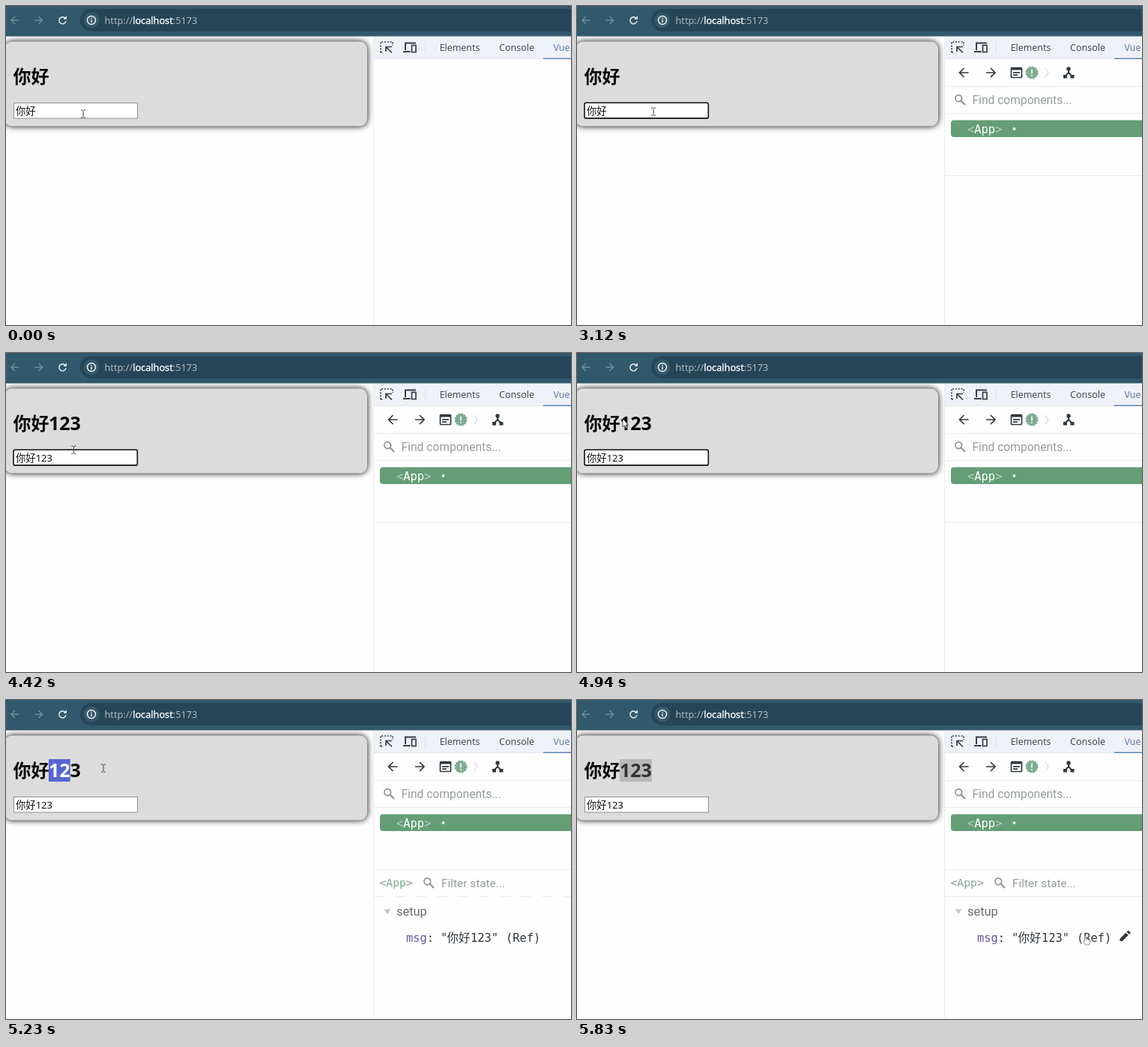
These frames come from a looping animation (754 px wide and 426 px high, 5930 ms). An HTML page:

```html
<!DOCTYPE html>
<html lang="zh-CN">
<head>
<meta charset="utf-8">
<title>Lazy model binding</title>
<style>
  html, body { margin: 0; width: 100%; height: 100%; overflow: hidden; background: #fefefe; }
  svg { display: block; width: 100vw; height: 100vh; }
  .ui { font-family: "Noto Sans", "Noto Sans CJK SC", "Noto Sans CJK JP", sans-serif; }
  .cjk { font-family: "Noto Sans CJK SC", "Noto Sans CJK JP", "Noto Sans CJK", sans-serif; }
  .rob { font-family: Roboto, sans-serif; font-size: 15.6px; fill: #969c9c; }
  .mono { font-family: "DejaVu Sans Mono", "Noto Sans CJK SC", monospace; font-size: 15.4px; fill: #2f363c; }
  .line { stroke: #ececee; stroke-width: 1; }
  .icon { fill: none; stroke-width: 1.7; }
</style>
</head>
<body>
<svg viewBox="0 0 754 426">
  <defs>
    <filter id="blur" x="-10%" y="-30%" width="120%" height="160%"><feGaussianBlur stdDeviation="4.2"/></filter>
    <g id="lens" class="icon" stroke="#8d9494"><circle cx="-1.7" cy="-1.7" r="4.4"/><path d="M1.6 1.6L7 7" stroke-width="2.1"/></g>
    <path id="arrow" d="M6 0H-5.5M0-6L-6 0L0 6"/>
  </defs>
  <rect width="754" height="426" fill="#fefefe"/>

  <!-- page card -->
  <rect x="-2" y="47.6" width="484" height="112.8" rx="10" filter="url(#blur)"/>
  <rect x="-2" y="47.6" width="484" height="112.8" rx="10" fill="#dcdcdc"/>
  <rect id="mark" x="57" y="79" height="30"/>
  <g font-size="24" font-weight="700" fill="#080808">
    <text x="9.5" y="103" class="cjk">你好</text>
    <text x="57" y="103" class="ui" font-size="25"><tspan id="picked"></tspan><tspan id="rest"></tspan></text>
  </g>
  <rect id="field" fill="#fff"/>
  <g font-size="13.3" fill="#111">
    <text x="13" y="144.5" class="cjk">你好</text>
    <text id="typed" x="39.7" y="144.5" class="ui" font-size="12.9"></text>
  </g>
  <path id="caret" d="M0 132.5V147" stroke="#333"/>

  <!-- browser bar -->
  <rect width="754" height="40.5" fill="#31586c"/>
  <path d="M754 4H114a15 15 0 0 0 0 30H754z" fill="#264558"/>
  <g class="icon" stroke="#718d9c" stroke-width="1.4">
    <use href="#arrow" transform="translate(12 19) scale(.85)"/>
    <use href="#arrow" transform="translate(43.5 19) scale(-.85 .85)"/>
    <path d="M79 16.3A4.6 4.6 0 1 0 80 20.2M80.2 13.8V17H77" stroke="#f0f4f6" style="stroke-width:1.4"/>
  </g>
  <circle cx="114" cy="19" r="10.5" fill="#36586b"/>
  <g class="icon" stroke="#f4f7f8" style="stroke-width:1.4"><circle cx="114" cy="19" r="5.5"/><path d="M114 18.3V22M114 15.8V17.2"/></g>
  <text x="131.5" y="23.5" class="ui" font-size="12.7" fill="#aebcc4">http://<tspan fill="#fff" stroke="#fff" stroke-width=".3">localhost</tspan>:5173</text>

  <!-- inspector tabs -->
  <path d="M490.5 41V426" class="line"/>
  <rect x="491" y="41" width="263" height="29.5" fill="#eff1f8"/>
  <path d="M491 70.5H754" stroke="#e2e5ec"/>
  <path d="M717 70.3H754" stroke="#5f83b5" stroke-width="1.5"/>
  <path d="M559.5 48V63" stroke="#dde0e8"/>
  <g class="icon" stroke="#3a3f45">
    <path d="M500 62V48H516V53M500 62H504" stroke-dasharray="2 1.8"/>
    <path d="M515 62.5L507.5 55M507 61V54.5H515"/>
    <path d="M533 59V49.5H547M530 61H539.5" style="stroke-width:2"/><rect x="541.5" y="52.5" width="5.5" height="9"/>
  </g>
  <g class="ui" font-size="12.4" fill="#454a50">
    <text x="578.7" y="60">Elements</text><text x="658" y="60" font-size="12.5">Console</text><text x="730.5" y="60" fill="#5b7ba4">Vue</text>
  </g>

  <!-- component tree -->
  <g id="tree">
    <g class="icon" stroke="#30393f">
      <use href="#arrow" transform="translate(516.5 89)"/>
      <use href="#arrow" transform="translate(552 89) scale(-1 1)"/>
      <rect x="579.5" y="82.5" width="14" height="13" rx="1"/>
      <path d="M579 84H594" stroke-width="3"/><path d="M582 88.8H591M582 92.2H588"/>
      <path d="M656 85V89L651 94M656 89L661 94" stroke-width="2"/>
    </g>
    <g fill="#30393f"><circle cx="656" cy="84" r="2.7"/><rect x="649" y="92" width="5" height="4.5"/><rect x="658.5" y="92" width="5" height="4.5"/></g>
    <circle cx="607" cy="89" r="7.4" fill="#7fac90"/>
    <circle cx="607" cy="89" r="7.7" fill="none" stroke="#7fac90" stroke-width="1.6" stroke-dasharray="3 1.03"/>
    <path d="M607 84.5V90.5M607 92V94" stroke="#eef6f0" stroke-width="1.8"/>
    <path d="M625 83L629 89L625 95" fill="none" stroke="#d5d8da" stroke-width="1.3"/>
    <path d="M491 107.5H754M491 143.5H754" class="line"/>
    <use href="#lens" x="511" y="125"/>
    <text x="527.5" y="131" class="rob">Find components...</text>
    <path d="M754 152.6H503a4 4 0 0 0-4 4V171a4 4 0 0 0 4 4H754z" fill="#649d76"/>
    <text x="521" y="170" class="mono" style="fill:#b5d2bf">&lt;<tspan fill="#fff">App</tspan>&gt;</text>
    <circle cx="583.5" cy="164" r="2" fill="#e8f3eb"/>
    <path id="treeEnd" class="line"/>
  </g>

  <!-- component state -->
  <g id="state">
    <text x="498.5" y="249" class="mono" style="font-size:14.7px;fill:#8b9490">&lt;<tspan fill="#7fa78e">App</tspan>&gt;</text>
    <use href="#lens" x="564" y="244"/>
    <text x="581" y="250" class="rob" style="font-size:15.4px">Filter state...</text>
    <path id="stateLine" d="M491 262.5H754" class="line"/>
    <path d="M504.5 279.5H513.5L509 286z" fill="#c3c6c7"/>
    <text x="521" y="288" class="rob" style="font-size:16.4px;fill:#666b6d">setup</text>
    <g class="mono">
      <text x="534" y="323"><tspan fill="#6a55a4">msg</tspan>:</text>
      <text x="580" y="323">"</text>
      <text x="588.5" y="323" class="cjk">你好</text>
      <text x="620" y="323">123"</text>
      <text x="667" y="323">(Ref)</text>
    </g>
    <path id="pencil" d="M724.5 322V318.7L732.5 310.7L735.8 314L727.8 322zM733.5 309.7L735 308.2Q735.7 307.6 736.4 308.2L738.3 310.1Q738.9 310.8 738.3 311.5L736.8 313z" fill="#30393f"/>
  </g>

  <!-- pointers, centred on 0,0 -->
  <g id="pointer">
    <path id="beam" d="M-3-5H-.7M.7-5H3M0-4.5V4.5M-3 5H-.7M.7 5H3" fill="none" stroke="#3c4042"/>
    <path id="tip" d="M-2-6V5L.6 2.6L2.4 6.4L4 5.6L2.3 2H5.6z" fill="#fff" stroke="#333" stroke-width=".8"/>
    <path id="hand" d="M-2.5-5.5Q-1.5-6.5-.7-5.5V-1.5L4-.5Q5 0 4.7 1.5L3.5 6H-1.5L-4.5 1.5Q-4.5.3-2.5 1z" fill="#fff" stroke="#777" stroke-width=".8"/>
  </g>
</svg>
<script>
const LOOP = 5930, START = 2400, TICK = 100.9;
const $ = id => document.getElementById(id);
const set = (id, attrs) => { for (const k in attrs) $(id).setAttribute(k, attrs[k]); };
const show = (id, on) => set(id, { visibility: on ? 'visible' : 'hidden' });
const within = (n, from, to) => n >= from && n <= to;
const clamp = (n, max) => Math.max(0, Math.min(max, n));

// tick, x, y
const path = [
  [-1, 103, 144], [0, 103, 141], [7, 102, 141], [15, 104, 147], [18, 104, 147],
  [24, 63, 94], [25, 63, 94], [28, 130, 91], [31, 130, 91], [34, 680, 321]
];

function pointerAt(n) {
  const i = path.findIndex(p => p[0] >= n);
  if (i < 1) return path[0].slice(1);
  const [a, ax, ay] = path[i - 1], [b, bx, by] = path[i];
  const k = (n - a) / (b - a);
  return [ax + (bx - ax) * k, ay + (by - ay) * k];
}

function draw(t) {
  const n = t < START ? -1 : Math.min(34, Math.floor((t - START) / TICK + 0.15));
  const open = n >= 0, focused = within(n, 0, 25);

  const keys = clamp(n - 7, 3);
  $('typed').textContent = '123'.slice(0, keys);
  set('field', focused
    ? { x: 10, y: 129.2, width: 165.3, height: 20.7, rx: 2, stroke: '#111', 'stroke-width': 1.6 }
    : { x: 10.5, y: 129.5, width: 165, height: 20.5, rx: 0, stroke: '#919191', 'stroke-width': 1 });
  set('caret', { transform: `translate(${39.5 + keys * 7.4} 0)` });
  show('caret', within(n, 0, 4) || within(n, 8, 14));

  const heading = n >= 17 ? '123' : '';
  const chosen = clamp(n - 26, 3), faded = n >= 33;
  $('picked').textContent = heading.slice(0, chosen);
  $('rest').textContent = heading.slice(chosen);
  set('picked', { fill: faded ? '#333' : '#fff' });
  set('mark', { width: chosen * 14.3, fill: faded ? '#b8b8b8' : '#5965d0' });

  show('tree', open);
  set('treeEnd', { d: `M491 226.5H${n > 0 ? 754 : 504}` });
  show('state', n >= 28);
  set('stateLine', { 'stroke-dasharray': n === 28 ? '14 14' : 'none' });
  show('pencil', n >= 34);

  const [x, y] = pointerAt(n);
  set('pointer', { transform: `translate(${x} ${y})` });
  const kind = n >= 34 ? 'hand' : within(n, 23, 25) || n >= 32 ? 'tip' : 'beam';
  for (const id of ['beam', 'tip', 'hand']) show(id, id === kind);
}

const begin = performance.now();
function frame() {
  draw((performance.now() - begin) % LOOP);
  requestAnimationFrame(frame);
}
frame();
</script>
</body>
</html>
```
